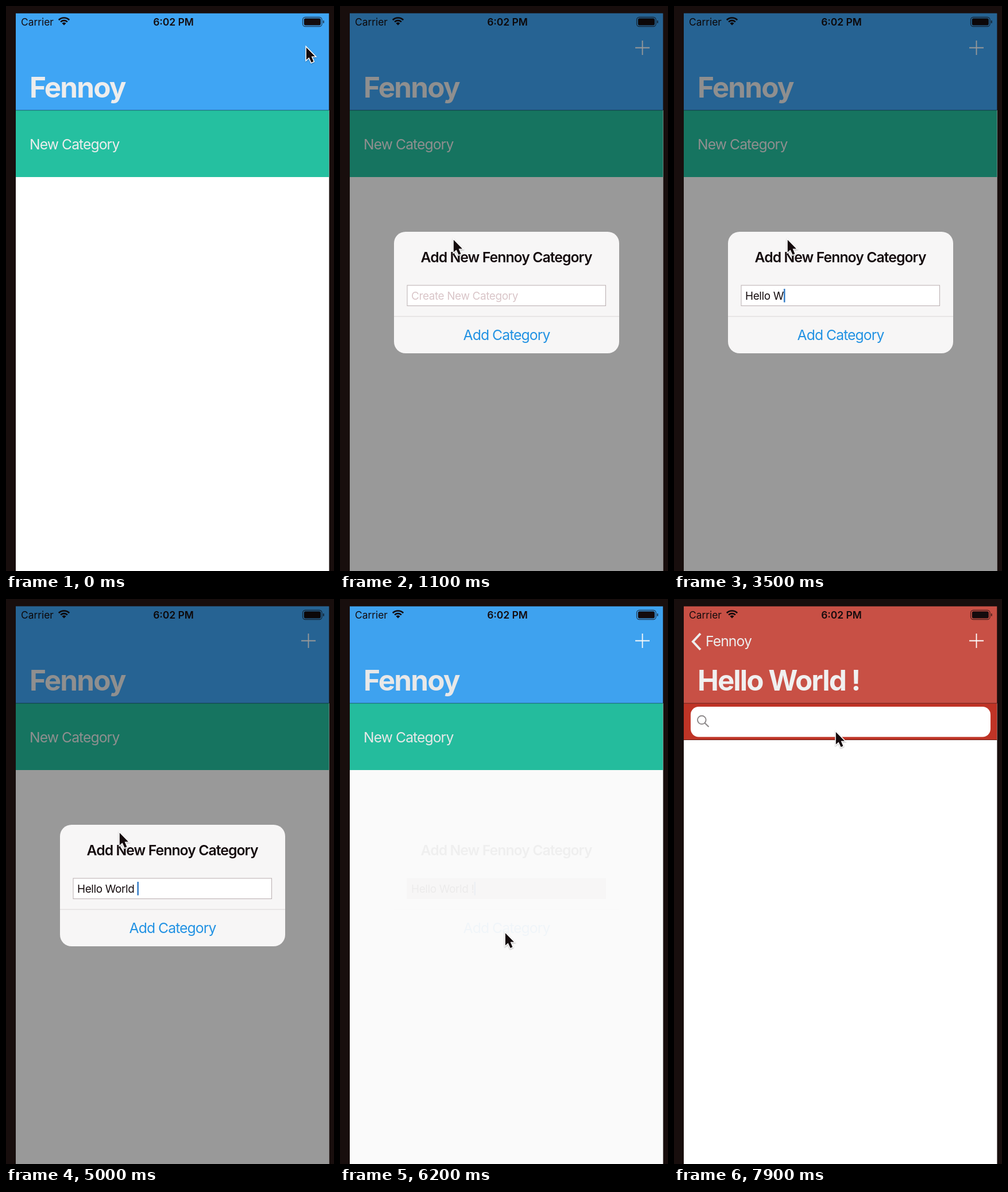
Write an HTML page with a canvas that moves like this. It is 571x981 px and loops after 8 s.

```html
<!DOCTYPE html>
<html lang="en">
<head>
<meta charset="utf-8">
<title>To-do list</title>
<style>
html, body { margin: 0; width: 100%; height: 100%; overflow: hidden; background: #180e0d; }
canvas { display: block; width: 571px; height: 981px; }
</style>
</head>
<body>
<canvas id="stage"></canvas>
<script>
const W = 571, H = 981, LOOP = 8000, STEP = 100;
const APP = 'Fennoy', ITEM = 'Hello World !';
const LEFT = 17, TOP = 12.5, WIDTH = 545.5, NAV_END = 181, ROW = 116.5;
const LIGHT = '#ededed', INK = '#140b0d';
const BLUE = [63, 165, 244], RED = [200, 80, 69];

// Moment at which each character of the new item is typed
const KEYS = [1700, 1900, 2100, 2300, 2500, 3000, 3300, 3700, 3900, 4100, 4300, 4700, 5100];

// Pointer moves: start, end, from, to
const MOVES = [
  [860, 1100, [522, 71], [197, 405]],
  [5200, 5500, [197, 405], [287, 579]],
  [6400, 7000, [287, 579], [205, 372]],
  [7400, 7800, [205, 372], [281, 230]]
];

const canvas = document.getElementById('stage');
const ctx = canvas.getContext('2d');
const dpr = window.devicePixelRatio || 1;
canvas.width = W * dpr;
canvas.height = H * dpr;

const clamp = v => Math.max(0, Math.min(1, v));
const span = (t, a, b) => clamp((t - a) / (b - a));
const mix = (a, b, k) => a + (b - a) * k;
const smooth = k => k * k * (3 - 2 * k);

function fade(alpha, draw) {
  if (alpha <= 0) return;
  ctx.save();
  ctx.globalAlpha *= alpha;
  draw();
  ctx.restore();
}

function rect(x, y, w, h, color) {
  ctx.fillStyle = color;
  ctx.fillRect(x, y, w, h);
}

function round(x, y, w, h, r, color) {
  ctx.beginPath();
  ctx.roundRect(x, y, w, h, r);
  ctx.fillStyle = color;
  ctx.fill();
}

function line(points, width, color, cap = 'butt') {
  ctx.beginPath();
  points.forEach(([x, y]) => ctx.lineTo(x, y));
  ctx.lineWidth = width;
  ctx.lineCap = cap;
  ctx.strokeStyle = color;
  ctx.stroke();
}

function text(str, x, y, size, color, { weight = 400, track = -0.037, align = 'left' } = {}) {
  ctx.font = `${weight} ${size}px Inter, "Liberation Sans", sans-serif`;
  ctx.letterSpacing = `${size * track}px`;
  ctx.textAlign = align;
  ctx.fillStyle = color;
  ctx.fillText(str, x, y);
  return ctx.measureText(str).width;
}

function statusBar() {
  text('Carrier', 26, 33.5, 17.4, INK, { track: 0 });
  text('6:02 PM', 291.5, 33.5, 17.4, INK, { weight: 600, track: 0, align: 'center' });

  const cx = 101, cy = 33.5, a = Math.PI / 4;
  ctx.beginPath();
  ctx.moveTo(cx, cy);
  ctx.arc(cx, cy, 5, -3 * a, -a);
  ctx.fillStyle = INK;
  ctx.fill();
  ctx.lineWidth = 2.7;
  ctx.lineCap = 'butt';
  ctx.strokeStyle = INK;
  for (const r of [8.3, 13]) {
    ctx.beginPath();
    ctx.arc(cx, cy, r, -3 * a, -a);
    ctx.stroke();
  }

  ctx.beginPath();
  ctx.roundRect(516.5, 19.5, 33.5, 16, 4.5);
  ctx.lineWidth = 1.3;
  ctx.strokeStyle = 'rgba(20,11,13,.65)';
  ctx.stroke();
  round(518.8, 21.6, 29, 11.8, 2.5, INK);
  round(551.8, 25, 2, 5, 1, 'rgba(20,11,13,.65)');
}

function plus(alpha) {
  fade(alpha, () => {
    line([[514, 72.5], [539, 72.5]], 1.8, '#fff');
    line([[526.5, 60], [526.5, 85]], 1.8, '#fff');
  });
}

function navBar(t, p) {
  const k = smooth(span(p, 0.2, 0.95));
  const rgb = BLUE.map((v, i) => Math.round(mix(v, RED[i], k)));
  rect(LEFT, TOP, WIDTH, NAV_END - TOP, `rgb(${rgb})`);
  statusBar();
  plus(smooth(span(t, 150, 450)));

  // The large title shrinks into the back label
  const size = mix(49.4, 24.7, p), x = mix(41, 55, p), y = mix(158.5, 82, p);
  fade(1 - span(p, 0.2, 0.9), () => text(APP, x, y, size, LIGHT, { weight: 700 }));
  fade(span(p, 0.4, 1), () => text(APP, x, y, size, LIGHT));
  fade(span(p, 0.3, 1), () => line([[46, 60], [33, 74], [46, 88]], 4, LIGHT));
  fade(span(p, 0.2, 0.9), () =>
    text(ITEM, 41 + WIDTH * (1 - p), 158.5, 49.4, '#f0f0f0', { weight: 700, track: -0.04 }));
  rect(LEFT, NAV_END - 0.5, WIDTH, 1, 'rgba(0,0,0,.45)');
}

function row(label, i, color) {
  const y = NAV_END + i * ROW;
  rect(LEFT, y, WIDTH, ROW - 0.5, color);
  text(label, 41, y + 67.5, 24.7, LIGHT);
}

function listPage(t, p) {
  ctx.save();
  ctx.translate(-0.3 * WIDTH * p, 0);
  rect(LEFT, NAV_END, WIDTH * 1.3, H - NAV_END, '#fff');
  row('New Category', 0, '#25c0a0');
  if (t >= 6300) row(ITEM, 1, t >= 7100 ? '#dccbcb' : '#c0392b');
  ctx.restore();
  rect(LEFT, NAV_END, WIDTH, H - NAV_END, `rgba(0,0,0,${0.08 * p})`);
}

function detailPage(p) {
  if (p <= 0) return;
  ctx.save();
  ctx.translate(WIDTH * (1 - p), 0);
  const shade = ctx.createLinearGradient(LEFT - 10, 0, LEFT, 0);
  shade.addColorStop(0, 'rgba(60,40,40,0)');
  shade.addColorStop(1, `rgba(60,40,40,${0.3 * (1 - p)})`);
  rect(LEFT - 10, NAV_END, 10, H - NAV_END, shade);
  rect(LEFT, NAV_END, WIDTH, H - NAV_END, '#fff');
  rect(LEFT, NAV_END, WIDTH, 64, '#bf3426');
  rect(LEFT, 244, WIDTH, 1, '#6b1c14');
  round(29, 187, 522, 52.5, 14, '#fff');
  ctx.beginPath();
  ctx.arc(48.3, 210, 7.3, 0, 7);
  ctx.lineWidth = 2;
  ctx.strokeStyle = '#8e8a8b';
  ctx.stroke();
  line([[53.6, 215.3], [60.5, 222]], 2.2, '#8e8a8b');
  ctx.restore();
}

function alertBox(t) {
  const enter = span(t, 200, 600);
  const leave = span(t, 6020, 6240);
  const alpha = smooth(enter) * Math.pow(1 - leave, 1.8);
  if (alpha <= 0) return;

  const scale = 1 + 0.15 * Math.pow(1 - enter, 3);
  fade(alpha, () => {
    rect(LEFT, TOP, WIDTH, H, 'rgba(0,0,0,.4)');
    ctx.translate(290, 497.5);
    ctx.scale(scale, scale);
    ctx.translate(-290, -497.5);
    round(94, 392, 392, 211, 20, '#f7f6f6');
    text(`Add New ${APP} Category`, 289.5, 444.5, 24.7, INK, { weight: 600, align: 'center' });
    rect(116.5, 484.5, 346.5, 36.5, '#b9aeb0');
    rect(117.5, 485.5, 344.5, 34.5, '#fff');
    rect(94, 538.5, 392, 1, '#dad8d8');
    text('Add Category', 290, 580, 24.7, '#2292e3', { align: 'center' });
    field(t);
  });
}

function field(t) {
  const typed = KEYS.filter(k => k <= t).length;
  const style = { track: -0.019 };
  let end = 124;
  if (typed) end += text(ITEM.slice(0, typed), 124, 509.5, 18.9, INK, style);
  else text('Create New Category', 124, 509.5, 18.9, '#d9c5c8', style);
  const since = t - (typed ? KEYS[typed - 1] : 600);
  if (since >= 0 && since % 1000 < 500) rect(end, 491, 2.6, 23.5, '#3a80c8');
}

function pointer(t) {
  let [x, y] = MOVES[0][2];
  for (const [a, b, from, to] of MOVES) {
    if (t < a) break;
    const k = smooth(span(t, a, b));
    x = mix(from[0], to[0], k);
    y = mix(from[1], to[1], k);
  }
  ctx.save();
  ctx.translate(x + 0.8, y + 1);
  ctx.beginPath();
  for (const [px, py] of [[0, 0], [0, 21.5], [4.8, 17.2], [8.8, 26], [12.6, 24.3], [8.8, 15.6], [15.2, 15.4]]) {
    ctx.lineTo(px, py);
  }
  ctx.closePath();
  ctx.shadowColor = 'rgba(0,0,0,.3)';
  ctx.shadowBlur = 2 * dpr;
  ctx.shadowOffsetY = dpr;
  ctx.lineWidth = 3;
  ctx.lineJoin = 'miter';
  ctx.strokeStyle = '#fff';
  ctx.stroke();
  ctx.shadowColor = 'transparent';
  ctx.fillStyle = INK;
  ctx.fill();
  ctx.restore();
}

// Critically damped spring for the page push
function push(t) {
  const u = Math.max(0, t - 7250) * 0.0134;
  const p = 1 - (1 + u) * Math.exp(-u);
  return p > 0.995 ? 1 : p;
}

function draw(t) {
  const p = push(t);
  ctx.setTransform(dpr, 0, 0, dpr, 0, 0);
  rect(0, 0, W, H, '#180e0d');
  ctx.save();
  ctx.beginPath();
  ctx.rect(LEFT, TOP, WIDTH, H - TOP);
  ctx.clip();
  listPage(t, p);
  detailPage(p);
  navBar(t, p);
  alertBox(t);
  ctx.restore();
  pointer(t);
}

// The screen refreshes ten times a second
function tick() {
  const t = performance.now() % LOOP;
  draw(Math.floor(t / STEP) * STEP);
  requestAnimationFrame(tick);
}
tick();
</script>
</body>
</html>
```
